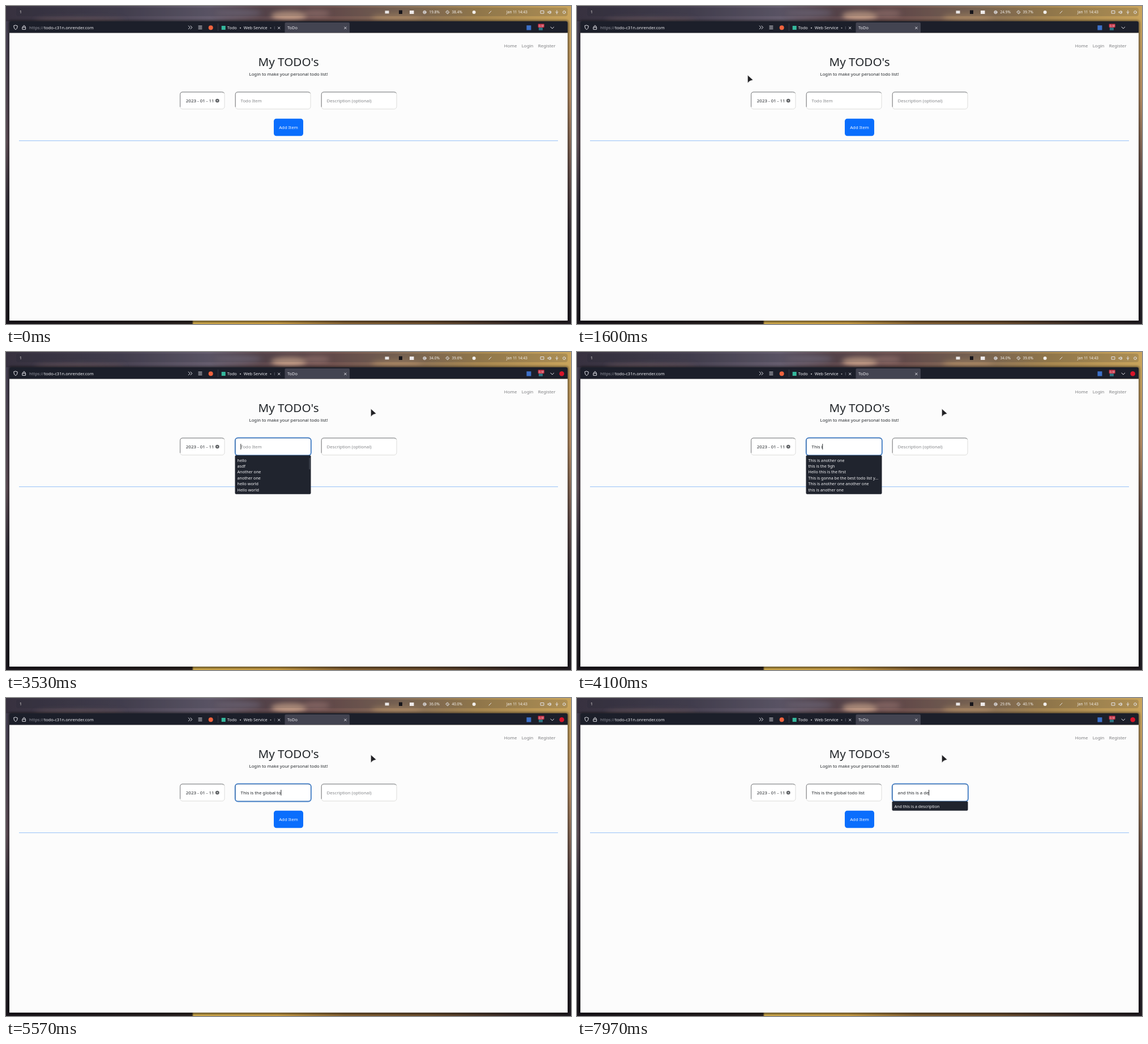
Recreate the animation shown at these times as an HTML page. Size 998 by 561 pixels, loop 8 s.

```html
<!DOCTYPE html>
<html lang="en">
<head>
<meta charset="utf-8">
<title>Todo list</title>
<style>
  html, body { margin: 0; width: 100%; height: 100%; overflow: hidden; background: #2b2630; }
  svg { display: block; width: 998px; height: 561px; }
  text { font-family: "Noto Sans", "Open Sans", sans-serif; font-size: 7.8px; white-space: pre; fill: #212529; }
  .nav text { font-size: 7.95px; fill: #7d7e80; }
  .bar text { font-size: 6.5px; font-weight: 500; fill: #f4f0ec; }
  .chrome text { font-size: 7.4px; fill: #eeeef2; }
  .drop text { font-size: 7.15px; fill: #f4f4f6; }
  .icon { fill: none; stroke: #e4e4ea; stroke-width: 1; stroke-linecap: round; stroke-linejoin: round; }
  .hint { fill: #85878a; }
</style>
</head>
<body>
<svg viewBox="0 0 998 561" xmlns="http://www.w3.org/2000/svg">
  <defs>
    <linearGradient id="sky">
      <stop offset="0" stop-color="#37313f"/><stop offset=".2" stop-color="#484252"/>
      <stop offset=".36" stop-color="#655d6e"/><stop offset=".45" stop-color="#5d484e"/>
      <stop offset=".58" stop-color="#70524f"/><stop offset=".7" stop-color="#866d58"/>
      <stop offset=".84" stop-color="#a78750"/><stop offset="1" stop-color="#c9a45c"/>
    </linearGradient>
    <linearGradient id="ground">
      <stop offset="0" stop-color="#1b171d"/><stop offset=".329" stop-color="#2b2220"/>
      <stop offset=".332" stop-color="#d5ae4d"/><stop offset=".48" stop-color="#d0a246"/>
      <stop offset=".6" stop-color="#8b6534"/><stop offset=".75" stop-color="#70502f"/>
      <stop offset=".9" stop-color="#3b2c2a"/><stop offset="1" stop-color="#211c22"/>
    </linearGradient>
    <linearGradient id="left" x2="0" y2="1">
      <stop offset="0" stop-color="#454052"/><stop offset=".4" stop-color="#5b4b53"/>
      <stop offset=".6" stop-color="#35303a"/><stop offset="1" stop-color="#18151b"/>
    </linearGradient>
    <linearGradient id="right" x2="0" y2="1">
      <stop offset="0" stop-color="#c9a45c"/><stop offset=".25" stop-color="#b58b62"/>
      <stop offset=".5" stop-color="#66504c"/><stop offset=".7" stop-color="#342d35"/>
      <stop offset="1" stop-color="#1e1a20"/>
    </linearGradient>
    <filter id="soft" x="-30%" y="-60%" width="160%" height="220%"><feGaussianBlur stdDeviation="4"/></filter>
    <filter id="shade" x="-5%" y="-5%" width="110%" height="110%"><feGaussianBlur stdDeviation="2"/></filter>
  </defs>

  <rect width="998" height="561" fill="url(#sky)"/>
  <g filter="url(#soft)">
    <ellipse cx="500" cy="17" rx="32" ry="8" fill="#c29b85"/>
    <ellipse cx="548" cy="13" rx="24" ry="6" fill="#94706a"/>
    <ellipse cx="410" cy="12" rx="42" ry="5" fill="#756978"/>
    <ellipse cx="690" cy="20" rx="45" ry="6" fill="#a68462"/>
    <ellipse cx="130" cy="25" rx="80" ry="5" fill="#5a4c53"/>
  </g>
  <rect y="27" width="8" height="534" fill="url(#left)"/>
  <rect x="990" y="27" width="8" height="534" fill="url(#right)"/>
  <rect y="553" width="998" height="8" fill="url(#ground)"/>
  <rect x="18" y="3" width="974" height="15" rx="4" fill="#1d2030" opacity=".16"/>
  <rect x="5" y="26" width="988" height="531" rx="3" fill="#08080c" opacity=".7" filter="url(#shade)"/>

  <g class="bar">
    <text x="24" y="13.2">1</text>
    <path d="M669.5 8.3h7v5h-7z" fill="#e9e6e6"/>
    <path d="M694 7.5h6v6.5h-6z" fill="#17151a"/>
    <path d="M713 8h7.5v6H713z" fill="#eeeaea"/>
    <g class="icon">
      <circle cx="739.5" cy="11" r="2.7"/><path d="M738.5 10h2v2h-2z"/>
      <path d="M780 8l3 3-3 3-3-3zM778.5 9.5l3 3"/>
      <path d="M853 13l4-4"/>
      <path d="M944.5 8.5h5.5v4.5h-5.5z"/>
      <path d="M957.5 10h1.5l2-1.7v5.4l-2-1.7h-1.5zM962.5 9.5v3"/>
      <path d="M973 8v3M971 10.5q2 3.5 4 0M973 12.5v1.5"/>
      <circle cx="986" cy="11" r="2.3"/>
    </g>
    <circle cx="826.7" cy="11" r="3" fill="#f1eeea"/>
    <text id="cpu" x="747.5" y="13.2"></text>
    <text id="mem" x="787.5" y="13.2"></text>
    <text x="884" y="13.2">Jan 11 14:43</text>
  </g>

  <g class="chrome">
    <path d="M6 47V30q0-3 3-3h980q3 0 3 3v17z" fill="#1c1f2a"/>
    <path d="M492.5 47V31q0-2 2-2H605q2 0 2 2v16z" fill="#434451"/>
    <path d="M374.5 31v13" stroke="#343744"/>
    <g class="icon">
      <path d="M17 34l3.3 1.2q.2 4.5-3.3 6.6-3.5-2.1-3.3-6.6z"/>
      <path d="M29.2 37.3h5.4v3.9h-5.4zM30.2 37v-1.4q1.7-3 3.4 0V37"/>
      <path d="M322.3 35l2.7 2.8-2.7 2.8M326 35l2.7 2.8-2.7 2.8"/>
      <path d="M340 35.3h6M340 37.8h6M340 40.3h6"/>
      <path d="M480.5 37l3.4 3.4M483.9 37l-3.4 3.4M597.7 37l3.4 3.4M601.1 37l-3.4 3.4"/>
      <path d="M962 37l2.9 2.8 2.9-2.8"/>
    </g>
    <circle cx="361.7" cy="38.2" r="4" fill="#f0633e"/>
    <rect x="380.7" y="35" width="7" height="7" fill="#35b89d"/>
    <rect x="919.5" y="34.2" width="8" height="8.3" fill="#3d70c8"/>
    <rect x="941" y="36" width="7" height="6.8" fill="#2f7280"/>
    <rect x="939.7" y="31.5" width="11" height="6.5" rx="1" fill="#c92f42"/>
    <text x="941" y="36.8" style="font-size:5.3px">0.9!</text>
    <text x="41" y="40.5" style="font-size:7.6px"><tspan fill="#92939d">https://</tspan>todo-c31n.onrender.com</text>
    <text x="390.7" y="41.2">Todo</text>
    <text x="419.7" y="41.2">Web Service</text>
    <circle cx="414" cy="38.7" r="1" fill="#ddd"/><circle cx="467.5" cy="38.7" r="1" fill="#aaa"/>
    <path d="M474.3 36v5.2" stroke="#555865"/>
    <text x="497" y="41.2">ToDo</text>
    <circle id="rec" cx="981.7" cy="38.2" r="4.3" fill="#d8152a"/>
  </g>

  <path d="M6 47.5h986V555H6z" fill="#fcfcfc"/>
  <g class="nav">
    <text x="879.8" y="73.2">Home</text>
    <text x="910.7" y="73.2">Login</text>
    <text x="939.8" y="73.2">Register</text>
  </g>
  <text x="499" y="105.6" text-anchor="middle" style="font-size:20.7px">My TODO's</text>
  <text x="499" y="123" text-anchor="middle">Login to make your personal todo list!</text>
  <g id="fields"></g>
  <rect id="ring" y="151.3" width="134.2" height="31.2" rx="5" fill="none" stroke="#4580c8" stroke-width="1.8"/>
  <text x="317.8" y="169.9" style="font-size:7.95px">2023 - 01 - 11</text>
  <circle cx="373.3" cy="167" r="3.3" fill="#55585b"/>
  <path d="M372.1 165.8l2.4 2.4M374.5 165.8l-2.4 2.4" stroke="#fff" stroke-width=".8"/>
  <text id="item" x="414.6" y="169.9"></text>
  <text id="desc" x="566.6" y="169.9"></text>
  <path id="caret" d="M0 162v10" stroke="#15171a" stroke-width=".9"/>
  <rect x="473" y="198.7" width="52" height="30.5" rx="4.5" fill="#0a6efd"/>
  <text x="499" y="217.2" text-anchor="middle" style="fill:#f5f9ff">Add Item</text>
  <path d="M23 237.6h952" stroke="#a9cbf8" stroke-width="1.4"/>
  <g id="drop" class="drop"></g>
  <path id="pointer" d="M0 0V14.3L3.8 10.7 9.8 8.7Z" fill="#222225" stroke="#f3f3f3" stroke-width=".8" stroke-linejoin="round"/>
</svg>
<script>
const LOOP = 8000;
const $ = id => document.getElementById(id);

const ITEM = 'This is the global todo list';
const DESC = 'and this is a description';
const itemKeys = [[3560, 0], [4650, 13], [5550, 21], [5990, 28]];
const descKeys = [[6430, 0], [6700, 4], [6740, 4], [7790, 15], [7960, 16]];

const recent = ['hello', 'asdf', 'Another one', 'another one', 'hello world', 'Hello world'];
const matches = ['This is another one', 'this is the 9gh', 'Hello this is the first',
  'This is gonna be the best todo list y...', 'This is another one another one', 'this is another one'];
const notes = ['Another thing', 'And this is a description', 'Another todo list', 'Yea man go to sleep'];

// [start, left edge, rows]
const menus = [[0, 0, []], [2600, 404.5, recent], [3680, 404.5, matches], [4860, 0, []],
  [6540, 556.5, notes], [6800, 556.5, [notes[1]]]];
const stats = [[0, '19.8%', '38.4%'], [1130, '24.9%', '39.7%'], [3150, '34.0%', '39.6%'],
  [5180, '36.0%', '40.0%'], [7170, '29.6%', '40.1%']];
const focus = [[0, ''], [2470, 'item'], [6060, 'desc']];
const path = [[370, 640, 230], [1170, 312, 190], [1500, 301.3, 121.8], [1700, 301.3, 121.8],
  [2030, 312, 150], [2300, 431, 159], [3130, 431, 155], [3370, 644.3, 100]];

const stepAt = (table, t) => table.filter(row => row[0] <= t).pop();

function tween(keys, t) {
  if (t <= keys[0][0]) return keys[0].slice(1);
  const i = keys.findIndex(k => k[0] > t);
  if (i < 0) return keys[keys.length - 1].slice(1);
  const [a, b] = [keys[i - 1], keys[i]];
  const p = (t - a[0]) / (b[0] - a[0]);
  return a.slice(1).map((v, n) => v + (b[n + 1] - v) * p);
}

function fieldBox(x, w) {
  return `<rect x="${x}" y="151.8" width="${w}" height="30" rx="4.5" fill="#fff" stroke="#dcdcda"/>
    <path d="M${x} 178V156.3q0-4.5 4.5-4.5h${w - 9}q3 0 4 2" fill="none" stroke="#77797c"/>`;
}
$('fields').innerHTML = fieldBox(307.6, 78.4) + fieldBox(405.2, 132.8) + fieldBox(557.2, 132.8);

function menuMarkup(x, rows) {
  if (!rows.length) return '';
  const h = rows.length * 10.4 + 6;
  const bar = rows === recent ? `<rect x="${x + 131}" y="187" width="1.6" height="20" fill="#454954"/>` : '';
  return `<rect x="${x}" y="182.3" width="134" height="${h}" rx="2" fill="#20242e"/>${bar}` +
    rows.map((row, i) => `<text x="${x + 4}" y="${193.6 + i * 10.4}">${row}</text>`).join('');
}

function showField(id, text, hint) {
  $(id).textContent = text || hint;
  $(id).setAttribute('class', text ? '' : 'hint');
}

let shownMenu;
function draw(t) {
  const [, cpu, mem] = stepAt(stats, t);
  $('cpu').textContent = cpu;
  $('mem').textContent = mem;
  $('rec').style.display = t < 2500 ? 'none' : '';

  const typed = {
    item: ITEM.slice(0, Math.floor(tween(itemKeys, t)[0])),
    desc: DESC.slice(0, Math.floor(tween(descKeys, t)[0]))
  };
  showField('item', typed.item, 'Todo Item');
  showField('desc', typed.desc, 'Description (optional)');

  const active = stepAt(focus, t)[1];
  $('ring').style.display = $('caret').style.display = active ? '' : 'none';
  if (active) {
    const el = $(active), x = +el.getAttribute('x');
    const w = typed[active] ? el.getComputedTextLength() : 0;
    $('ring').setAttribute('x', x - 9.9);
    $('caret').setAttribute('transform', `translate(${x + w + .2})`);
  }

  const menu = stepAt(menus, t);
  if (menu !== shownMenu) {
    $('drop').innerHTML = menuMarkup(menu[1], menu[2]);
    shownMenu = menu;
  }

  $('pointer').style.display = t < 370 ? 'none' : '';
  $('pointer').setAttribute('transform', `translate(${tween(path, t)})`);
}

const start = performance.now();
function tick() {
  draw((performance.now() - start) % LOOP);
  requestAnimationFrame(tick);
}
tick();
</script>
</body>
</html>
```
